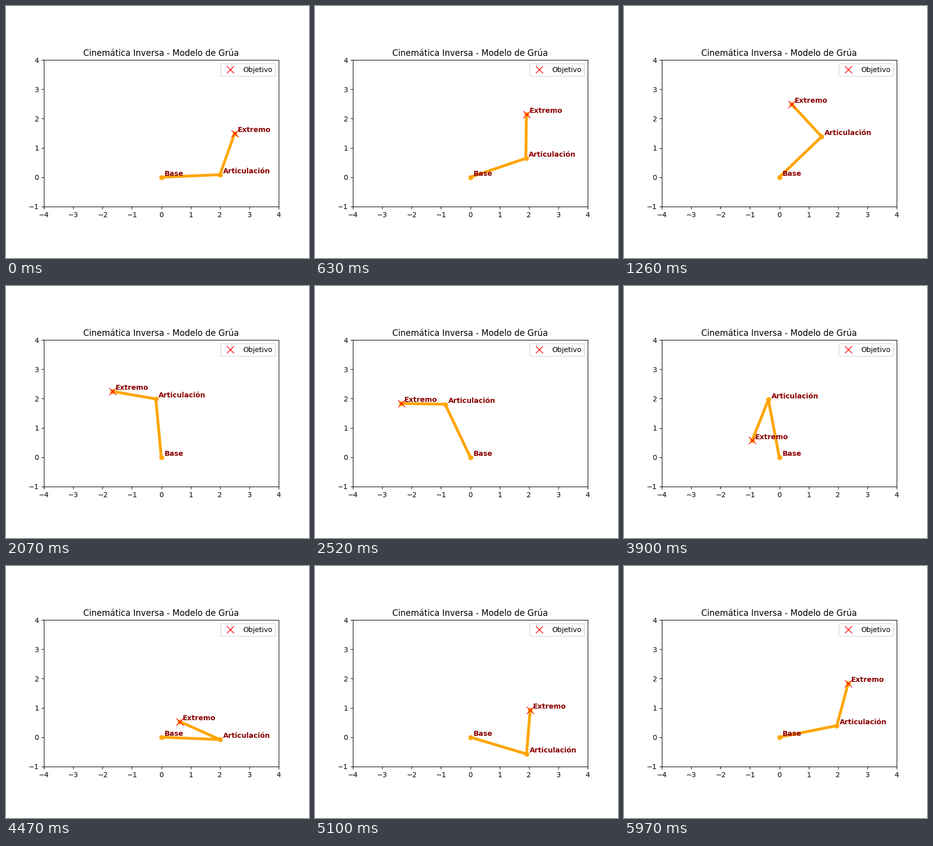
Recreate the animation shown at these times as a matplotlib script. Size 600x500 px, loop 6 s.

```python
import numpy as np
import matplotlib.pyplot as plt
from matplotlib.animation import FuncAnimation

L1, L2 = 2.0, 1.5
FRAMES, INTERVAL = 200, 30


def target_at(i):
    t = i / 30
    return 2.5 * np.cos(t), 1.5 + np.sin(t)


def elbow_for(x, y):
    """Elbow position of the two-link arm reaching (x, y)."""
    c2 = (x * x + y * y - L1**2 - L2**2) / (2 * L1 * L2)
    q2 = np.arccos(np.clip(c2, -1, 1))
    q1 = np.arctan2(y, x) - np.arctan2(L2 * np.sin(q2), L1 + L2 * np.cos(q2))
    return L1 * np.cos(q1), L1 * np.sin(q1)


fig, ax = plt.subplots(figsize=(6, 5), dpi=100)
ax.set_xlim(-4, 4)
ax.set_ylim(-1, 4)
ax.set_aspect("equal")
ax.set_title("Cinemática Inversa - Modelo de Grúa")

arm, = ax.plot([], [], "o-", lw=4, color="orange")
goal, = ax.plot([], [], "rx", markersize=10, label="Objetivo")
labels = [ax.text(0, 0, name, fontsize=10, color="darkred", weight="bold")
          for name in ("Base", "Articulación", "Extremo")]
ax.legend(loc="upper right")


def update(i):
    tip = target_at(i)
    joints = [(0, 0), elbow_for(*tip), tip]
    arm.set_data(*zip(*joints))
    goal.set_data([tip[0]], [tip[1]])
    for label, (x, y) in zip(labels, joints):
        label.set_position((x + 0.1, y + 0.05))
    return arm, goal, *labels


anim = FuncAnimation(fig, update, frames=FRAMES, interval=INTERVAL, repeat=True)
plt.show()
```
